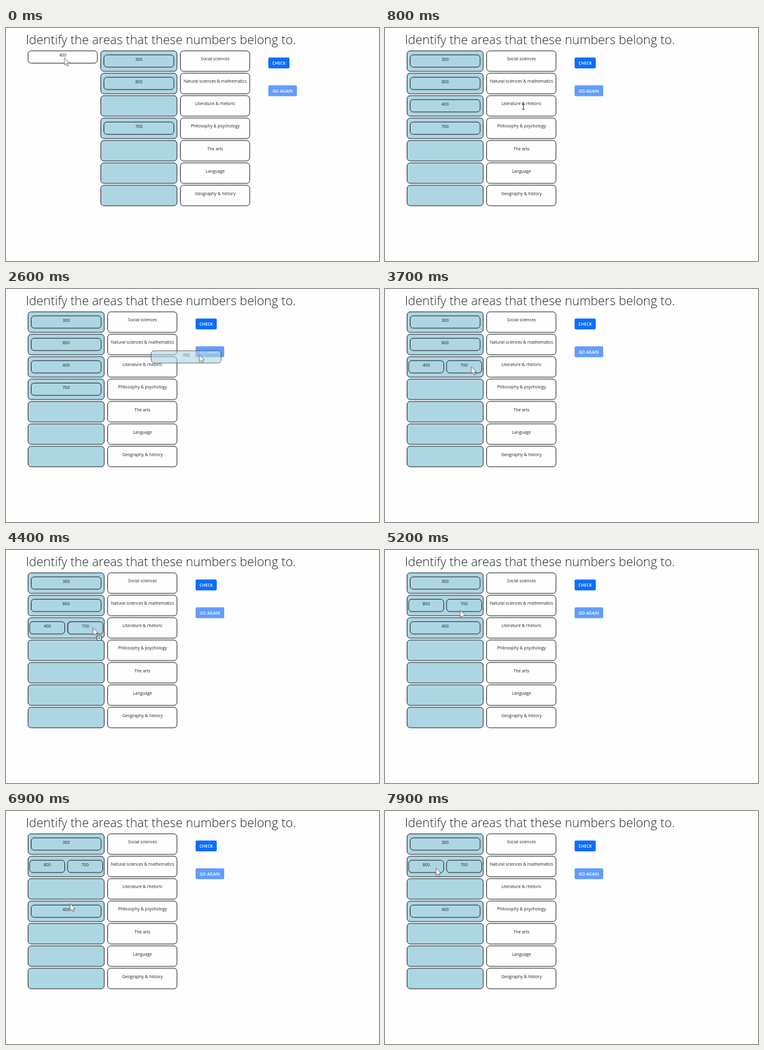
An HTML page with a canvas for the animation above (8 s loop, 600 px wide and 375 px high).

```html
<!DOCTYPE html>
<html lang="en">
<head>
<meta charset="utf-8">
<title>Number matching</title>
<style>
  html, body { margin: 0; width: 100%; height: 100%; overflow: hidden; background: #fefefe; }
  canvas { display: block; }
</style>
</head>
<body>
<canvas id="stage" width="600" height="375"></canvas>
<script>
const ctx = document.getElementById('stage').getContext('2d');
const LOOP = 8000, STEP = 100;
const TOP = 36.8, PITCH = 36.05, ROW_H = 33;
const INK = '#212529', BLUE = '#add6e3', PAPER = '#fefefe';
const FONT = '"Open Sans", "Noto Sans", sans-serif';
const LABELS = ['Social sciences', 'Natural sciences & mathematics', 'Literature & rhetoric',
  'Philosophy & psychology', 'The arts', 'Language', 'Geography & history'];

// Pointer moves; "carry" picks a number up, "row" drops it, "bend" bows the path.
const START = [94, 48];
const MOVES = [
  { from: 100, to: 700, end: [222, 126], carry: 400, row: 2 },
  { from: 1000, to: 1600, end: [118, 158] },
  { from: 1800, to: 2600, end: [311, 106], carry: 700, bend: [0, 97] },
  { from: 2800, to: 3500, end: [139, 125], carry: 700, row: 2 },
  { from: 4200, to: 5100, end: [121, 97], carry: 700, row: 1, bend: [90, 80] },
  { from: 5500, to: 5900, end: [105, 126] },
  { from: 6000, to: 6500, end: [107, 157], carry: 400, row: 3 },
  { from: 6700, to: 7300, end: [81, 103] },
  { from: 7400, to: 7900, end: [82, 92] }
];

const ease = u => u < 0.5 ? 4 * u ** 3 : 1 - 4 * (1 - u) ** 3;

function along(a, { from, to, end, bend = [0, 0] }, t) {
  const k = ease((t - from) / (to - from));
  const bow = Math.sin(Math.PI * k) ** 2;
  return a.map((v, i) => v + (end[i] - v) * k + bend[i] * bow);
}

function stateAt(t) {
  let rows = [[300], [800], [], [700], [], [], []];
  let at = START, held = null;
  for (const m of MOVES) {
    if (t < m.from) break;
    if (m.carry && !held) held = { num: m.carry, grab: at };
    if (t < m.to) {
      at = along(at, m, t);
      break;
    }
    at = m.end;
    if (m.row !== undefined) {
      rows = rows.map(row => row.filter(n => n !== m.carry));
      rows[m.row].push(m.carry);
      held = null;
    }
  }
  return { rows, at, held };
}

function box(x, y, w, h, r, fill, stroke) {
  ctx.beginPath();
  ctx.roundRect(x, y, w, h, r);
  if (fill) { ctx.fillStyle = fill; ctx.fill(); }
  if (stroke) { ctx.strokeStyle = stroke; ctx.lineWidth = 1; ctx.stroke(); }
}

function text(str, x, y, size, color = INK, align = 'center', weight = 400) {
  ctx.font = `${weight} ${size}px ${FONT}`;
  ctx.textAlign = align;
  ctx.fillStyle = color;
  ctx.fillText(str, x, y);
}

function tile(num, { x, y, w, fill }) {
  box(x, y, w, 19.8, 5, fill, INK);
  text(num, x + w / 2, y + 9.4, 6.8);
}

function button(label, x, y, w, color) {
  box(x, y, w, 17.5, 2, color);
  text(label, x + w / 2, y + 11.4, 6.7, '#fff', 'center', 600);
}

function arrow(x, y, plus) {
  ctx.save();
  ctx.translate(x, y);
  ctx.fillStyle = '#fff';
  ctx.strokeStyle = '#555';
  ctx.lineWidth = 0.8;
  const shape = new Path2D('M0 0V11.5L2.7 9.2 4.6 13.3 6.5 12.4 4.7 8.5 8.3 8.3Z');
  ctx.fill(shape);
  ctx.stroke(shape);
  if (plus) {
    box(6.5, 13, 7, 7, 0, '#fff', '#333');
    ctx.fillStyle = '#2a4a80';
    ctx.fillRect(8.2, 16, 3.6, 1);
    ctx.fillRect(9.5, 14.7, 1, 3.6);
  }
  ctx.restore();
}

function beam(x, y) {
  ctx.fillStyle = '#333';
  ctx.fillRect(x, y - 4, 1, 9);
  for (const end of [-4.5, 4.5]) ctx.fillRect(x - 1.5, y + end, 4, 1);
}

function draw(t) {
  const { rows, at: [px, py], held } = stateAt(t);
  const dx = rows.flat().includes(400) ? 0 : 117;
  const places = {};

  ctx.fillStyle = PAPER;
  ctx.fillRect(0, 0, 600, 375);
  text('Identify the areas that these numbers belong to.', 32, 26, 20.1, INK, 'left', 300);

  if (dx) places[400] = { x: 35.5, y: TOP, w: 111.5, fill: PAPER };
  rows.forEach((nums, i) => {
    const y = TOP + i * PITCH;
    box(dx + 35.5, y, 122.5, ROW_H, 5, BLUE, INK);
    box(dx + 163.5, y, 111.5, ROW_H, 5, PAPER, INK);
    text(LABELS[i], dx + 219.5, y + 15.5, 6.8);
    const pair = nums.length > 1;
    nums.forEach((num, k) => {
      places[num] = {
        x: dx + (pair ? 38 + k * 61 : 40.5), y: y + 6.4, w: pair ? 56.5 : 112.5, fill: BLUE
      };
    });
  });
  for (const num in places) tile(num, places[num]);

  button('CHECK', dx + 305, 47.5, 34, '#0d6efd');
  button('GO AGAIN', dx + 305, 92.3, 46, '#629dfe');

  if (held) {
    const home = places[held.num], [gx, gy] = held.grab;
    ctx.globalAlpha = 0.6;
    tile(held.num, { ...home, x: home.x + px - gx, y: home.y + py - gy });
    ctx.globalAlpha = 1;
  }

  const overLabel = !held && !dx && px > 163 && px < 275;
  const overSlot = px > dx + 35 && px < dx + 158;
  if (overLabel) beam(px, py);
  else arrow(px, py, held && overSlot);
}

function frame() {
  const t = performance.now() % LOOP;
  draw(Math.floor(t / STEP) * STEP);
  requestAnimationFrame(frame);
}
frame();
</script>
</body>
</html>
```
